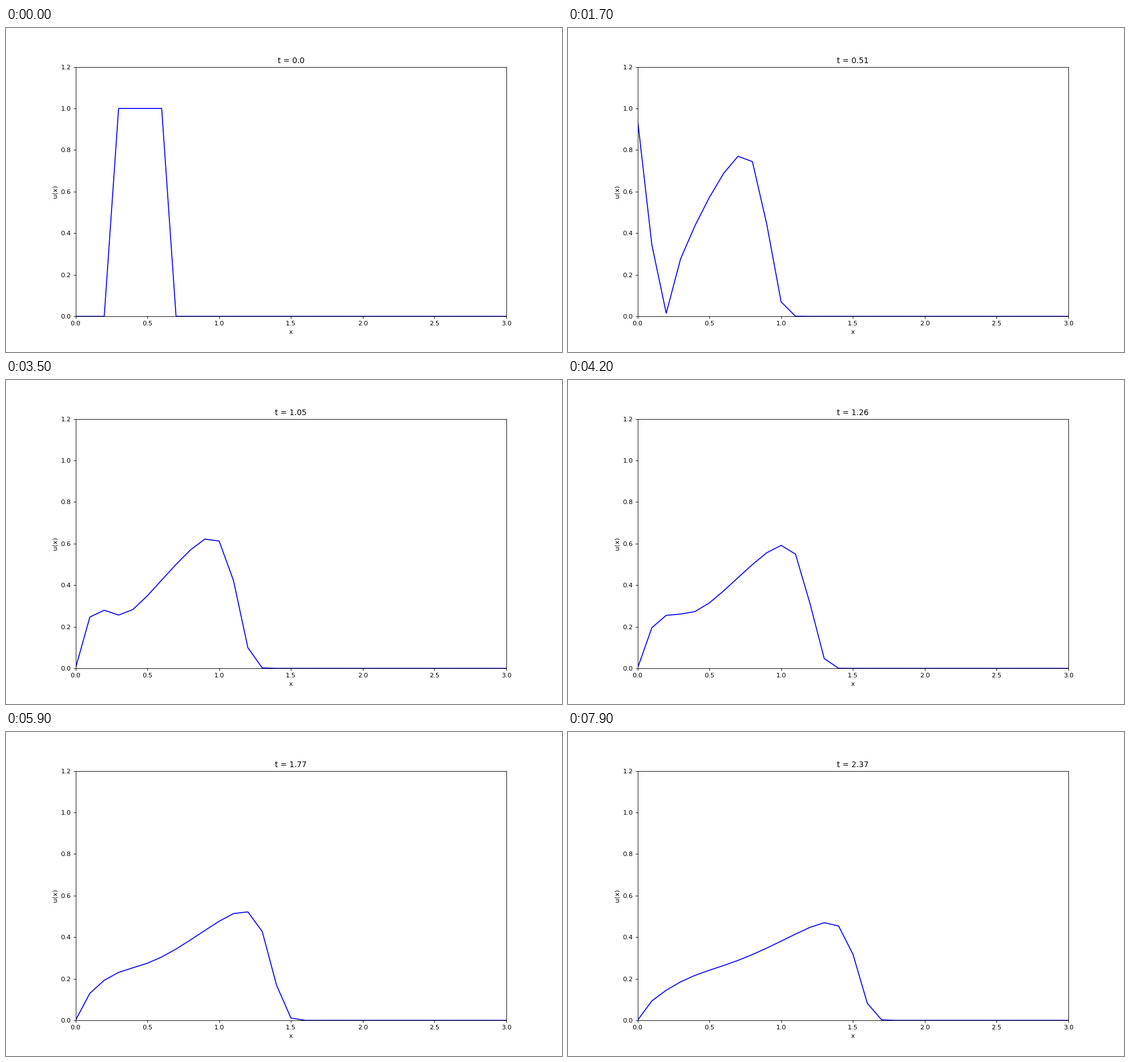
These frames come from a looping animation (980 px wide and 572 px high, 8000 ms). A matplotlib script:

```python
import matplotlib.pyplot as plt
import numpy as np
from matplotlib.animation import FuncAnimation

# Inviscid Burgers equation, first-order conservative upwind scheme
DX, DT = 0.1, 0.01
SUBSTEPS = 3
FRAMES, INTERVAL = 80, 100

SCALE = 49 / 48
plt.rcParams["font.family"] = "DejaVu Sans"
for key in (
    "font.size", "lines.linewidth", "axes.linewidth",
    "axes.labelpad", "axes.titlepad",
    "xtick.major.size", "xtick.major.width", "xtick.major.pad",
    "ytick.major.size", "ytick.major.width", "ytick.major.pad",
):
    plt.rcParams[key] *= SCALE


def inflow(t):
    """Triangular pulse entering at x = 0."""
    return max(0.0, 1 - abs(t - 0.5) / 0.2)


def solve():
    u = np.zeros(31)
    u[3:7] = 1.0
    states = [u.copy()]
    for n in range(1, (FRAMES - 1) * SUBSTEPS + 1):
        flux = u**2 / 2
        u[1:] -= DT / DX * np.diff(flux)
        u[0] = inflow(n * DT)
        if n % SUBSTEPS == 0:
            states.append(u.copy())
    return states


x = np.arange(31) * DX
states = solve()

fig, ax = plt.subplots(figsize=(12.25, 7.15), dpi=80)
line, = ax.plot(x, states[0], "b-")
ax.set_xlim(0, 3)
ax.set_ylim(0, 1.2)
ax.set_xlabel("x")
ax.set_ylabel("u(x)")
title = ax.set_title("t = 0.0")


def update(i):
    line.set_ydata(states[i])
    title.set_text(f"t = {round(i * SUBSTEPS * DT, 2)}")
    return line, title


anim = FuncAnimation(fig, update, frames=FRAMES, interval=INTERVAL,
                     repeat=True, repeat_delay=0)
plt.show()
```
